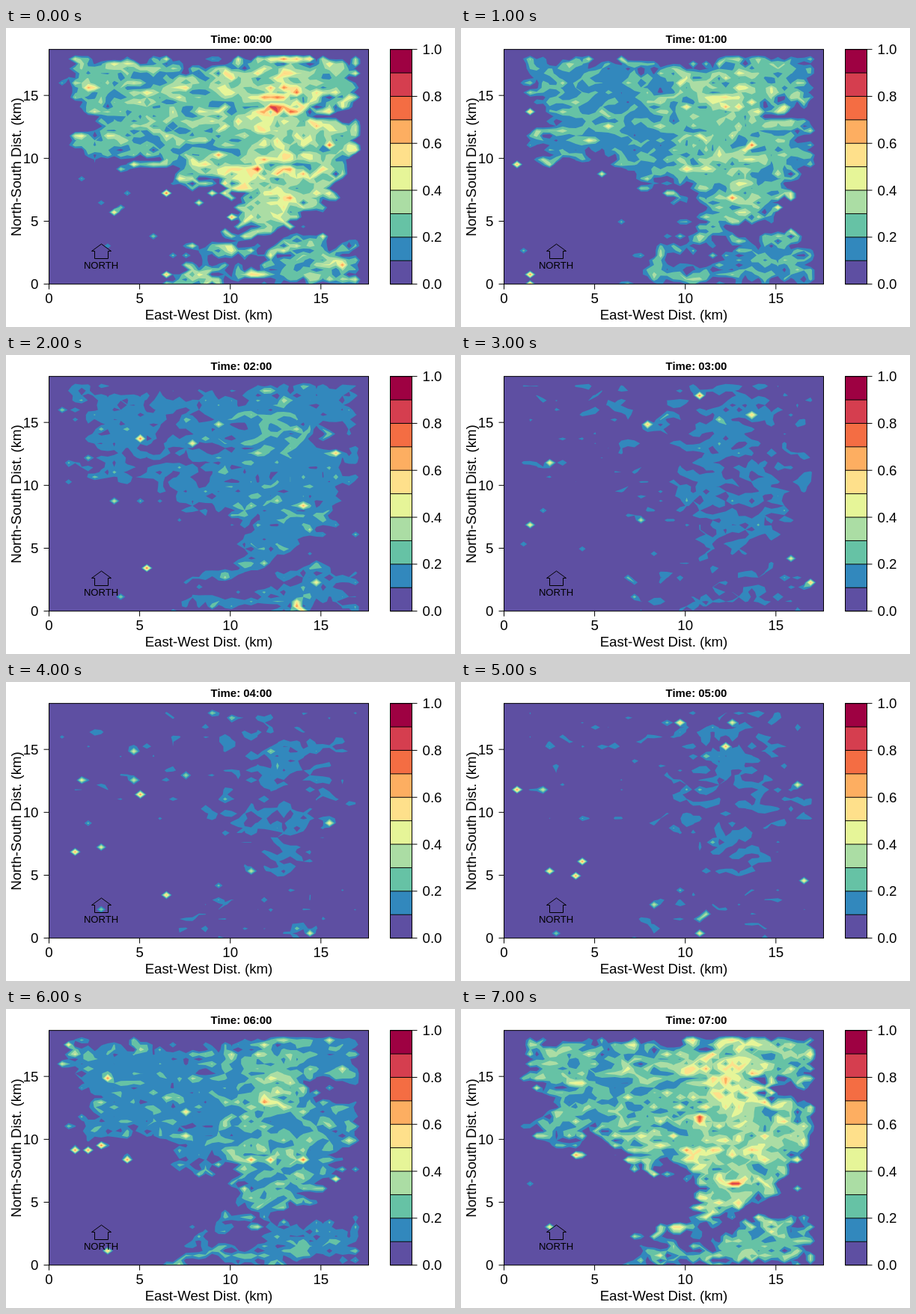
An HTML page with a canvas that plays this animation: 600 px wide and 400 px high, repeating every 8000 ms.

```html
<!DOCTYPE html>
<html>
<head>
<meta charset="utf-8">
<style>
html, body { margin: 0; width: 600px; height: 400px; overflow: hidden; background: #fff; }
canvas { display: block; }
</style>
</head>
<body>
<canvas id="stage" width="600" height="400"></canvas>
<script>
const ctx = document.getElementById('stage').getContext('2d');
const COLORS = ['#5E4FA2', '#3288BD', '#66C2A5', '#ABDDA4', '#E6F598',
  '#FEE08B', '#FDAE61', '#F46D43', '#D53E4F', '#9E0142'];
const LEFT = 57.5, TOP = 28.65, RIGHT = 484.5, BOTTOM = 342.65;
const N = 50, DX = (RIGHT - LEFT) / (N - 1), DY = (BOTTOM - TOP) / (N - 1);
const KM_X = 24.22, KM_Y = 16.83;
const FONT = '"Liberation Sans", Arial, sans-serif';
const LABEL = 18.67;
const STEP = 1000;

// Overall strength at each hour
const GAINS = [1, .76, .45, .3, .26, .27, .62, .93];

// Rough outlines of the two active areas, in stage pixels
const MAIN = [[88, 38], [300, 48], [340, 32], [472, 34], [473, 98], [405, 110], [470, 132],
  [470, 172], [425, 238], [370, 272], [300, 303], [245, 303], [320, 270], [300, 212],
  [235, 215], [205, 175], [130, 180], [80, 152], [122, 130], [88, 88]];
const SOUTH = [[215, 344], [262, 308], [300, 322], [385, 280], [472, 288], [472, 340]];

const clamp = t => Math.max(0, Math.min(1, t));
const smoothstep = t => t * t * (3 - 2 * t);
const bump = (x, y, cx, cy, rx, ry) => Math.exp(-(((x - cx) / rx) ** 2) - ((y - cy) / ry) ** 2);

function hash(x, y, seed) {
  let h = Math.imul(x + 11, 374761393) + Math.imul(y + 7, 668265263) + Math.imul(seed + 1, 1274126177);
  h = Math.imul(h ^ h >>> 13, 1274126177);
  h = Math.imul(h ^ h >>> 15, 2246822519);
  return ((h ^ h >>> 16) >>> 0) / 2 ** 32;
}

// Roughly normal noise with unit deviation
const bell = (c, r, s) => 2 * (hash(c, r, s) + hash(c, r, s + 50) + hash(c, r, s + 90) - 1.5);

function noise(c, r, seed) {
  const streak = (bell(c, r, seed) + bell(c + 1, r, seed) + bell(c + 2, r, seed)) / Math.sqrt(3);
  return .75 * bell(c, r, seed + 200) + .66 * streak;
}

// Distance to the outline, positive inside
function depth(outline, x, y) {
  let inside = false, best = Infinity;
  outline.forEach(([ax, ay], i) => {
    const [bx, by] = outline[(i + 1) % outline.length];
    const ex = bx - ax, ey = by - ay;
    const t = clamp(((x - ax) * ex + (y - ay) * ey) / (ex * ex + ey * ey));
    best = Math.min(best, Math.hypot(x - ax - t * ex, y - ay - t * ey));
    if ((ay > y) !== (by > y) && x < ax + ex * (y - ay) / ey) inside = !inside;
  });
  return inside ? best : -best;
}

function activity(x, y, wobble) {
  const d = Math.max(depth(MAIN, x, y), depth(SOUTH, x, y));
  const level = .24 + .1 * bump(x, y, 365, 150, 60, 110)
    + .12 * bump(x, y, 365, 82, 48, 40) + .08 * bump(x, y, 362, 235, 48, 24);
  return smoothstep(clamp((d + 5 + 8 * wobble) / 17)) * level;
}

function makeField(hour) {
  const value = (c, r) => {
    if (c < 2 || c > 47 || r > 47) return 0;
    const n = .6 * noise(c, r, 3) + .8 * noise(c, r, 10 + hour);
    const v = GAINS[hour] * activity(LEFT + c * DX, BOTTOM - r * DY, n) * Math.exp(.34 * n);
    const peak = hash(c, r, 400 + hour) < .012 ? .2 + .6 * hash(c, r, 500 + hour) ** 2 : 0;
    return Math.max(v, peak);
  };
  return Array.from({ length: N }, (_, r) => Array.from({ length: N }, (_, c) => value(c, r)));
}

// Fill every part of the field that lies above a level
function fillAbove(field, level, color) {
  ctx.beginPath();
  for (let r = 0; r < N - 1; r++) for (let c = 0; c < N - 1; c++) {
    const corners = [[c, r], [c + 1, r], [c + 1, r + 1], [c, r + 1]];
    const points = [];
    corners.forEach(([x, y], i) => {
      const [nx, ny] = corners[(i + 1) % 4];
      const a = field[y][x], b = field[ny][nx];
      if (a >= level) points.push([x, y]);
      if ((a >= level) !== (b >= level)) {
        const t = (level - a) / (b - a);
        points.push([x + t * (nx - x), y + t * (ny - y)]);
      }
    });
    points.forEach(([x, y], i) => ctx[i ? 'lineTo' : 'moveTo'](LEFT + x * DX, BOTTOM - y * DY));
    if (points.length) ctx.closePath();
  }
  ctx.fillStyle = color;
  ctx.fill();
}

function text(str, x, y, size = LABEL, align = 'center', weight = '') {
  ctx.font = `${weight} ${size}px ${FONT}`;
  ctx.textAlign = align;
  ctx.fillStyle = '#000';
  ctx.fillText(str, x, y);
}

function line(...points) {
  ctx.beginPath();
  points.forEach(([x, y]) => ctx.lineTo(x, y));
  ctx.stroke();
}

function drawAxes() {
  ctx.strokeRect(LEFT, TOP, RIGHT - LEFT, BOTTOM - TOP);
  for (let km = 0; km <= 15; km += 5) {
    const x = LEFT + km * KM_X, y = BOTTOM - km * KM_Y;
    line([x, BOTTOM], [x, BOTTOM + 7]);
    line([LEFT, y], [LEFT - 7, y]);
    text(km, x, 368);
    text(km, 43.5, y + 6.5, LABEL, 'right');
  }
  text('East-West Dist. (km)', 271, 390);
  ctx.save();
  ctx.translate(19.5, 186);
  ctx.rotate(-Math.PI / 2);
  text('North-South Dist. (km)', 0, 0);
  ctx.restore();
}

function drawLegend() {
  const x = 513.5, w = 29, h = (BOTTOM - TOP) / COLORS.length;
  COLORS.forEach((color, i) => {
    ctx.fillStyle = color;
    ctx.fillRect(x, BOTTOM - (i + 1) * h, w, h);
  });
  for (let i = 0; i <= COLORS.length; i++) {
    const y = BOTTOM - i * h;
    line([x, y], [x + w, y]);
    if (i % 2) continue;
    line([x + w, y], [x + w + 7, y]);
    text((i / 10).toFixed(1), 556.5, y + 6.5, LABEL, 'left');
  }
  ctx.strokeRect(x, TOP, w, BOTTOM - TOP);
}

function drawNorth() {
  line([127.5, 289], [140.5, 298.5], [136.5, 298.5], [136.5, 308.5], [118.5, 308.5],
    [118.5, 298.5], [114.5, 298.5], [127.5, 289]);
  text('NORTH', 127, 322, 13.07);
}

function draw(hour) {
  ctx.fillStyle = '#fff';
  ctx.fillRect(0, 0, 600, 400);
  ctx.fillStyle = COLORS[0];
  ctx.fillRect(LEFT, TOP, RIGHT - LEFT, BOTTOM - TOP);
  const field = makeField(hour);
  COLORS.forEach((color, i) => i && fillAbove(field, i / COLORS.length, color));
  ctx.strokeStyle = '#000';
  ctx.lineWidth = 1;
  drawAxes();
  drawLegend();
  drawNorth();
  text(`Time: 0${hour}:00`, 314.5, 20, 14.93, 'center', 'bold');
}

let shown = -1;
const start = performance.now();
function tick() {
  const hour = Math.floor((performance.now() - start) / STEP) % GAINS.length;
  if (hour !== shown) draw(shown = hour);
  requestAnimationFrame(tick);
}
tick();
</script>
</body>
</html>
```
